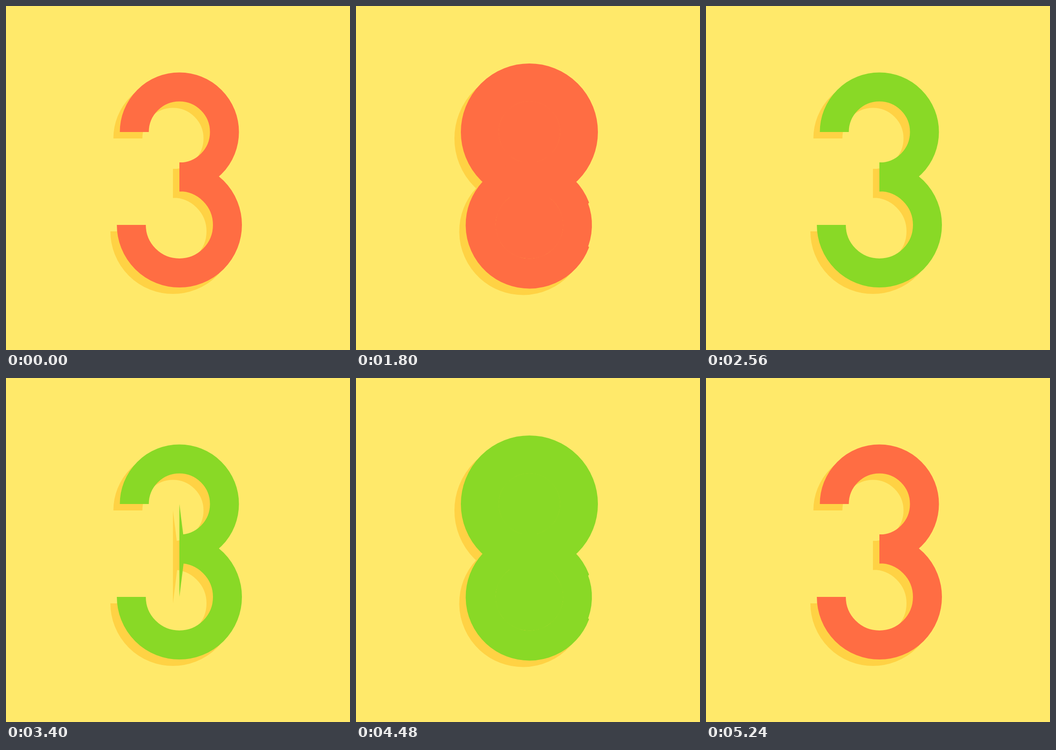
An HTML page with a canvas that plays this animation: 748x748 px, repeating every 5360 ms.

```html
<!DOCTYPE html>
<html lang="en">
<head>
<meta charset="utf-8">
<title>Three</title>
<style>
  html, body { margin: 0; width: 100%; height: 100%; overflow: hidden; background: #ffe96a; }
  canvas { display: block; width: 748px; height: 748px; }
</style>
</head>
<body>
<canvas id="stage" width="748" height="748"></canvas>
<script>
const ctx = document.getElementById('stage').getContext('2d');
const BG = '#ffe96a', SHADE = '#ffd244', INKS = ['#ff6d43', '#89d926'];
const HALF = 2680, STEP = 40, X = 377, THICK = 63, DROP = 14;
const TOP = { y: 274, r: 98 }, LOW = { y: 476, r: 104.5 };

const clamp = v => Math.max(0, Math.min(1, v));
const ease = u => u < .5 ? 4 * u ** 3 : 1 - 4 * (1 - u) ** 3;
const ramp = (t, start, span) => ease(clamp((t - start) / span));

// Linear interpolation through [time, value] pairs, flat outside them.
function track(t, keys) {
  if (t <= keys[0][0]) return keys[0][1];
  for (let i = 1; i < keys.length; i++) {
    const [a, v] = keys[i - 1], [b, w] = keys[i];
    if (t <= b) return v + (w - v) * (t - a) / (b - a);
  }
  return keys[keys.length - 1][1];
}

// Angles are in degrees, clockwise from 3 o'clock.
function arc(y, r, from, to, width, cap = 'butt') {
  if (to <= from || width <= 0) return;
  ctx.beginPath();
  ctx.arc(X, y, r, from * Math.PI / 180, to * Math.PI / 180);
  ctx.lineWidth = width;
  ctx.lineCap = cap;
  ctx.stroke();
}

function pie(bowl, from, to) {
  if (to <= from) return;
  ctx.beginPath();
  ctx.moveTo(X, bowl.y);
  ctx.arc(X, bowl.y, bowl.r - THICK / 2 + .5, from * Math.PI / 180, to * Math.PI / 180);
  ctx.fill();
}

const ring = (bowl, from, to) => arc(bowl.y, bowl.r, from, to, THICK);

// Stroke along the outer edge of a bowl, bulging outwards by swell.
function rim(bowl, from, to, swell) {
  arc(bowl.y, bowl.r + THICK / 2, from, to, swell * 2, 'round');
}

function pose(t) {
  return {
    fill: ramp(t, 600, 702) - ramp(t, 1960, 320),
    lowClose: ramp(t, 960, 500) - ramp(t, 1900, 340),
    topClose: ramp(t, 1080, 460) - ramp(t, 1920, 340),
    lowSwell: track(t, [[1480, 0], [1600, 12], [1680, 25], [1720, 27], [1760, 15], [1800, 2.5], [1820, 0]]),
    topSwell: track(t, [[1560, 0], [1680, 11], [1720, 18.5], [1760, 25.5], [1800, 19.5], [1840, 9], [1880, 0]]),
    lowGap: track(t, [[1760, 0], [1800, 21], [1820, 30]]),
    topGap: track(t, [[1820, 0], [1880, 30]]),
    draw: ramp(t, 1820, 400),
    lowTail: track(t, [[2160, 0], [2280, 27], [2360, 20], [2520, 0]]),
    topTail: track(t, [[2220, 0], [2320, 40], [2400, 24], [2540, 0]]),
    lowSpan: track(t, [[2160, 20], [2280, 45], [2520, 5]]),
    topSpan: track(t, [[2220, 20], [2320, 50], [2540, 5]])
  };
}

function digit(t, p, oldInk, newInk) {
  const use = ink => { ctx.fillStyle = ctx.strokeStyle = ink; };
  if (t < 2280) {
    use(oldInk);
    ring(TOP, 180 - 90.3 * p.topClose, 450);
    ring(LOW, -90 - 60.3 * p.lowClose, 180 + 30 * p.lowClose);
    pie(TOP, 90 + 360 * (1 - p.fill), 450);
    pie(LOW, -90, -90 + 360 * p.fill);
    rim(TOP, p.topGap, 360 - p.topGap, p.topSwell);
    rim(LOW, p.lowGap, 360 - p.lowGap, p.lowSwell);
  }
  use(newInk);
  ring(TOP, 450 - 270 * p.draw, 450);
  ring(LOW, -90, -90 + 270 * p.draw);
  arc(TOP.y, TOP.r + THICK / 2, 180, 180 + p.topSpan, p.topTail * 2);
  arc(LOW.y, LOW.r + THICK / 2, -p.lowSpan, p.lowSpan, p.lowTail * 2);
}

function render(now) {
  const time = Math.floor(now / STEP) * STEP;
  const turn = Math.floor(time / HALF) % 2;
  const t = time % HALF;
  const p = pose(t);
  ctx.fillStyle = BG;
  ctx.fillRect(0, 0, 748, 748);
  ctx.save();
  ctx.translate(-DROP, DROP);
  digit(t, p, SHADE, SHADE);
  ctx.restore();
  digit(t, p, INKS[turn], INKS[1 - turn]);
}

let origin;
function loop(now) {
  origin ??= now;
  render(Math.max(0, now - origin));
  requestAnimationFrame(loop);
}
render(0);
requestAnimationFrame(loop);
</script>
</body>
</html>
```
